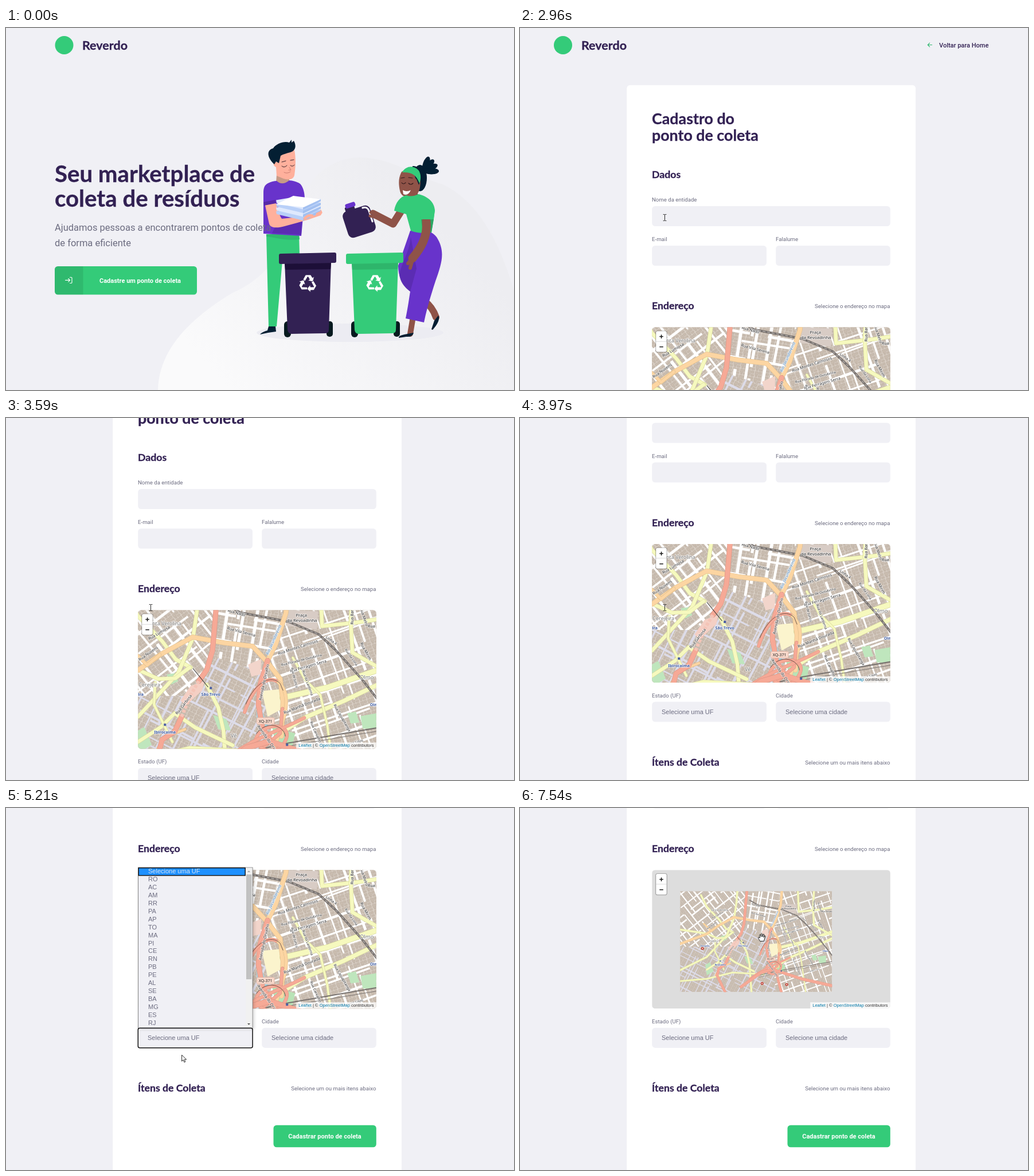
Animation, 886 px wide and 632 px high, one loop 8 s. Source, as an HTML page:

```html
<!DOCTYPE html>
<html lang="pt-BR">
<head>
<meta charset="utf-8">
<title>Pontos de coleta</title>
<style>
html, body { margin: 0; width: 100%; height: 100%; overflow: hidden; background: #f0f0f5; }
svg { display: block; width: 100vw; height: 100vh; }
text { white-space: pre; }
.head { font-family: Lato, sans-serif; font-weight: 700; fill: #322153; stroke: #322153; stroke-width: .3; }
.body { font-family: Roboto, sans-serif; fill: #6c6c80; }
.bold { font-family: Roboto, sans-serif; font-weight: 700; fill: #fff; }
.nav { font-family: Roboto, sans-serif; font-weight: 500; fill: #322153; }
.ui { font-family: "Liberation Sans", Arial, sans-serif; fill: #6c6c80; }
.map { font-family: "Noto Sans", sans-serif; text-anchor: middle; paint-order: stroke; stroke: #fff; stroke-width: 1.6; stroke-opacity: .8; }
.street { fill: #222; }
.area { fill: #777; }
.metro { fill: #3b5ba5; font-weight: 700; }
.river { fill: #4a86c0; font-style: italic; }
</style>
</head>
<body>
<svg id="stage" viewBox="0 0 886 632" preserveAspectRatio="none"></svg>
<script>
const LOOP = 8000;
const GREEN = '#34cb79', DARK_GREEN = '#2fb86e', PLUM = '#322153', VIOLET = '#6833cb';
const NAVY = '#041f33', PEACH = '#ffb09c', BROWN = '#8f5348';

let seed = 11;
const rnd = () => (seed = seed * 16807 % 2147483647) / 2147483647;

const text = (cls, size, x, y, str, extra = '') =>
  `<text class="${cls}" font-size="${size}" x="${x}" y="${y}" ${extra}>${str}</text>`;
const rect = (x, y, w, h, fill, r = 0, extra = '') =>
  `<rect x="${x}" y="${y}" width="${w}" height="${h}" rx="${r}" fill="${fill}" ${extra}/>`;
const shape = (d, fill) => `<path d="${d}" fill="${fill}"/>`;
const line = (d, color, w, extra = '') =>
  `<path d="${d}" fill="none" stroke="${color}" stroke-width="${w}" stroke-linecap="round" stroke-linejoin="round" ${extra}/>`;
const END = 'text-anchor="end"';

// ---------- home ----------
function recycle(x, y, back) {
  const d = 'M-9 -6L-4 -15H5L8 -10L11 -12L9 -3L0 -5L3 -7L0 -12L-5 -4Z';
  return [0, 120, 240].map(a =>
    `<path d="${d}" transform="translate(${x} ${y}) rotate(${a})" fill="#fff" stroke="${back}" stroke-width=".8"/>`).join('');
}

function bin(x, color, band) {
  return rect(x + 9, 512, 12, 28, '#061a1f', 6) + rect(x + 83, 512, 11, 27, '#061a1f', 5) +
    shape(`M${x + 10} 408H${x + 91}L${x + 87} 527Q${x + 87} 533 ${x + 80} 533L${x + 22} 534Q${x + 16} 534 ${x + 15} 527Z`, color) +
    shape(`M${x + 10} 410H${x + 91}L${x + 90} 421L${x + 11} 422Z`, band) +
    shape(`M${x + 3} 394L${x + 97} 392Q${x + 100} 392 ${x + 100} 395V407Q${x + 100} 410 ${x + 97} 410L${x + 3} 412Q${x} 412 ${x} 409V397Q${x} 394 ${x + 3} 394Z`, color) +
    recycle(x + 50.5, 446, color);
}

function man() {
  const sheets = [0, 1, 2, 3].map(i => {
    const y = 333 - i * 6.5;
    return shape(`M472 ${y - 8}L518 ${y + 3}L549 ${y - 11}V${y - 15}L500 ${y - 18}L471 ${y - 13}Z`, i % 2 ? '#dfe9fd' : '#b9d0f8') +
      shape(`M518 ${y - 1}L549 ${y - 15}V${y - 11}L518 ${y + 4}Z`, '#a3c0f0');
  }).join('');
  return shape('M454 360H511L512 395H483L472 521H458Z', GREEN) +
    shape('M454 360H511L512 369C490 372 470 366 454 364Z', DARK_GREEN) +
    shape('M458 521H470L471 530L457 532L443 535Q446 531 456 528Z', NAVY) +
    shape('M472 256H494V271Q482 280 471 271Z', '#c79a86') +
    shape('M474 218L503 213C506 228 505 244 503 257C501 266 491 265 484 263L472 258L471 243C464 240 466 231 473 234Z', PEACH) +
    shape('M468 238C455 226 454 213 466 210C471 202 485 197 494 200L498 195V200L502 197C507 206 505 214 496 217C489 219 484 220 479 223L476 236L471 233Z', NAVY) +
    line('M481 241Q485 245 490 240M496 240Q500 243 503 239M481 234L488 232M496 231L502 230', '#37232b', 1) +
    line('M485 252Q490 255 496 251M494 243L497 248H493', '#c4766b', .9) +
    shape('M457 271Q465 267 472 267Q482 276 494 266Q506 267 513 272C519 278 521 290 521 298L515 363L449 359V288C449 279 451 274 457 271Z', VIOLET) +
    shape('M472 342L516 336L515 361L464 358Z', '#5b2bb2') +
    shape('M451 305L469 302C474 314 476 326 481 333L519 329L549 317Q553 321 549 327L526 335L486 346C472 350 461 349 459 342Z', PEACH) +
    shape('M449 304L470 300L471 306L450 310Z', '#5729a8') + sheets +
    shape('M471 308L501 293L549 299L519 313Z', '#fff') +
    line('M521 333Q526 326 534 328M543 325L549 322', PEACH, 5);
}

function woman() {
  return line('M729 476Q744 487 750 505', BROWN, 12) + line('M709 510L705 534', BROWN, 10) +
    shape('M754 502C758 510 750 520 744 527L742 526L747 511Z', NAVY) +
    shape('M711 532Q709 540 698 539L685 541Q684 537 695 535Z', NAVY) +
    shape('M705 354C722 348 742 353 751 365C767 390 760 411 749 442C740 470 734 490 729 514L697 507C701 488 703 472 705 460C690 448 684 432 684 415Z', VIOLET) +
    shape('M706 365C704 390 690 410 686 430Q688 448 705 460L716 420Z', '#5b2cb3') +
    `<g fill="${NAVY}"><ellipse cx="722" cy="262" rx="12" ry="23"/>` +
    [-70, -48, -25, 0].map(a => `<ellipse cx="14" rx="13" ry="5.5" transform="translate(728 250) rotate(${a})"/>`).join('') + '</g>' +
    shape('M702 280H718V298H702Z', '#71413a') +
    shape('M690 251Q710 239 722 258C724 275 722 289 712 294Q690 299 687 284C684 270 685 260 690 251Z', BROWN) +
    shape('M709 241C722 240 727 255 720 274L716 264C712 262 714 253 709 253Z', NAVY) +
    shape('M691 252C697 240 712 239 720 249C725 257 723 267 721 271C716 258 709 251 691 252Z', GREEN) +
    line('M690 270Q693 274 697 270M702 271Q706 275 710 271M689 262L695 261M702 261L709 262', '#32191b', 1.1) +
    shape('M692 283Q699 287 706 283Q701 294 693 290Z', '#fff') +
    line('M690 318L675 342L640 324', BROWN, 13) +
    shape('M698 292Q708 296 719 290C736 294 747 304 748 318L742 357Q722 360 706 354L698 325L677 319C679 305 688 294 698 292Z', GREEN) +
    shape('M724 334H746L742 357L727 358Z', '#2aa865') +
    line('M733 337C736 365 723 385 709 402', BROWN, 15) + line('M711 398L705 419M707 403L701 411', BROWN, 6) +
    shape('M722 322L748 318L746 334H723Z', GREEN) +
    '<g transform="translate(616 338) rotate(-18)">' +
    rect(-25, -24, 50, 48, PLUM, 9) + rect(-17, -31, 17, 10, PLUM, 2) + rect(-15, -36, 18, 8, VIOLET, 3) +
    line('M13 -21Q22 -21 22 -12V7', '#fff', 3) + '</g>' + line('M636 322L645 326M635 328L643 330', BROWN, 5);
}

function home() {
  return shape('M265 632C267 560 322 507 394 463C450 438 480 400 500 335C516 270 562 226 617 226C680 228 713 260 762 273C820 301 858 365 886 458V632Z', 'url(#blob)') +
    '<circle cx="101.5" cy="30" r="16" fill="#34cb79"/>' + text('head', 21.5, 133, 38, 'Reverdo') +
    '<ellipse cx="600" cy="532" rx="163" ry="16" fill="#ececf2"/>' +
    man() + woman() + bin(476, PLUM, '#1d0f38') + bin(593, GREEN, '#2eb56b') +
    text('head', 40.2, 85, 269, 'Seu marketplace de') + text('head', 40.2, 85, 312, 'coleta de resíduos') +
    text('body', 16.5, 85, 354, 'Ajudamos pessoas a encontrarem pontos de coleta') +
    text('body', 16.5, 85, 381, 'de forma eficiente') +
    rect(85, 416, 248, 49.5, GREEN, 5.5, 'id="enter"') +
    shape('M134.500 416H90.500Q85 416 85 421.500V460Q85 465.500 90.500 465.500H134.500Z', 'rgba(0,0,0,.09)') +
    `<g transform="translate(103 433.500) scale(.57)">${line('M15 3H19A2 2 0 0 1 21 5V19A2 2 0 0 1 19 21H15M10 17L15 12L10 7M15 12H1', '#fff', 2)}</g>` +
    text('bold', 11, 163, 444.5, 'Cadastre um ponto de coleta');
}

// ---------- map ----------
const TILES = { x: -93, y: -44, w: 530, h: 352 };

// A district: houses crossed by two families of slightly uneven streets.
function zone(id, points, angle, gapX, gapY, color, width) {
  const street = d => line(d, color, (width * (.7 + rnd() * .6)).toFixed(1),
    `stroke-dasharray="${90 + rnd() * 150 | 0} ${10 + rnd() * 30 | 0}" style="stroke-linecap:butt"`);
  const family = (gap, path) => {
    let out = '';
    for (let p = -480; p < 480; p += gap * (.7 + rnd() * .6)) out += street(path(p | 0, (p + rnd() * 40 - 20) | 0));
    return out;
  };
  return `<clipPath id="${id}"><polygon points="${points}"/></clipPath><g clip-path="url(#${id})"><g transform="translate(170 130) rotate(${angle})">` +
    rect(-500, -500, 1000, 1000, 'url(#houses)') +
    family(gapX, (a, b) => `M${a} -500L${b} 500`) + family(gapY, (a, b) => `M-500 ${a}L500 ${b}`) + '</g></g>';
}

const road = (d, w, color, edge) => line(d, edge, w + 1.2) + line(d, color, w);
const pink = (d, w = 8) => road(d, w, '#f6a996', '#dc9484');
const orange = (d, w = 7.5) => road(d, w, '#fcd5a2', '#dfbd8b');
const yellow = (d, w = 6) => road(d, w, '#f6f9be', '#d5d69a');

function labels() {
  const streets = [
    ['Rua Vila Serena', 180, 38, 15], ['Rua Montes Calmosos', 279, 65, -18],
    ['Rua Florada de Outubrina', 285, 87, -14, 6], ['Rua Ferragem Serra', 297, 98, -16],
    ['Rua Manhã Dourada', 286, 167, -22], ['Avenida do Orvalho', 220, 126, -78],
    ['Avenida do Orvalho', 228, 228, 55], ['Rua Nuvens', 18, 76, -35], ['Rua Lumiosa', 37, 40, -30],
    ['Rua Garbosa', 80, 165, -52], ['Rua Nadir', 172, 5, 16], ['Rua Bambu', 374, 6, -90],
    ['Rua Melro', 394, 12, 72], ['Linha 4', 337, 53, 35, 6.5], ['Rua da Lona', 372, 82, 55, 6],
    ['Rua Mirim', 397, 72, 62], ['Rua de Junco', 273, 118, 76, 6], ['Rua da Lanterna', 296, 127, 70, 6],
    ['Rua Cajuapitanga', 356, 188, 60, 6.5], ['Rua Carvalho Leve', 313, 220, 66, 6.5],
    ['Campos Lisos', 374, 232, -15, 6], ['Rua Tessala', 420, 28, 0]];
  const areas = [['Praça', 285, 9, 0, 7.5], ['da Revoadinha', 286, 18, 0, 7.5]];
  const put = (cls, [s, x, y, a = 0, size = 7]) =>
    text(`map ${cls}`, size, 0, 2, s, `transform="translate(${x} ${y}) rotate(${a})"`);
  return streets.map(s => put('street', s)).join('') + areas.map(s => put('street', s)).join('') +
    [['Santa Verolina', 45, 24, 0, 9], ['Cerejeira', 20, 131, 0, 9], ['Olmo', 399, 118, 0, 9.5], ['Vê', 167, 220, 0, 9]]
      .map(s => put('area', s)).join('') +
    [['São Trevo', 127, 147], ['Ibirocaima', 47, 213], ['Olmo', 414, 165], ['Cerejeira', -6, 147]]
      .map(s => put('metro', s)).join('') +
    put('river', ['Rio Jacundarema', 237, 52, -66, 7.5]) +
    rect(207, 187.5, 31, 11.5, '#f8d7c9', 2, 'stroke="#dba999" stroke-width=".6"') +
    text('map street', 7, 222.5, 196, 'XQ-371', 'style="stroke:none"');
}

function tiles() {
  const rail = 'M150 -12L178 4L262 20L315 42L345 70L390 120L437 180';
  return rect(TILES.x, TILES.y, TILES.w, TILES.h, '#d3c7bb') +
    zone('za', '-93,-44 138,-44 128,80 95,150 -93,150', -38, 19, 25, '#fff', 4.6) +
    zone('zb', '138,-44 262,-44 245,60 225,110 220,140 125,100', 10, 20, 30, '#fff', 4.4) +
    zone('zc', '260,-44 437,-44 437,308 240,308 222,110', -19, 24, 25, '#fff', 3.6) +
    zone('zd', '-93,150 95,150 128,80 224,110 240,308 -93,308', 27, 18, 21, '#dddce9', 3.4) +
    shape('M258 0L314 2L312 34L258 27Z', '#d8ccc5') +
    shape('M216 141L248 138L252 172L226 186Z', '#fbf4cd') +
    shape('M207 150L214 170L228 205L220 216L207 190Z', '#abd3df') +
    shape('M234 204L274 215L268 242L240 236Z', '#b9e3b7') + shape('M365 180L380 177L386 196L371 198Z', '#bfe6bd') +
    shape('M388 185L416 180V207L392 207Z', '#bfe6bd') + shape('M131 183L154 190L162 210L140 208Z', '#bfe6bd') +
    shape('M-5 213L11 204L24 235L0 250Z', '#bfe6bd') + shape('M192 95L215 85L214 112L198 116Z', '#f2d5cb') +
    shape('M50 112L66 110L70 124L58 130Z', '#bfe6bd') + shape('M92 132L116 124L112 140L84 166L74 158Z', '#f4cfc4') +
    yellow('M-20 -30L0 10L42 54L66 86L92 100') + yellow('M107 -44L103 0L96 48L70 110L0 186L-93 232') +
    yellow('M-93 90L0 104L35 120L65 119L90 100') + yellow('M120 130L140 170L149 210L156 308') +
    yellow('M0 230L40 204L64 180L100 205L165 236') + yellow('M30 126L28 165L60 230', 4) +
    yellow('M252 153L330 135L437 98', 9) + yellow('M254 211L290 188L360 158L437 121', 7) +
    yellow('M318 -44L321 28L385 21L437 13') + yellow('M374 -44L371 20L374 74L437 110') +
    yellow('M270 83L292 122L318 148L330 200L345 308', 3.5) + yellow('M-93 270L0 262L90 240L200 246', 5) +
    line(rail, '#77716e', 4) + line(rail, '#b9b4b0', 1.2, 'stroke-dasharray="4 4"') +
    line('M170 252L262 232L437 202', '#77716e', 2) + line('M182 257L270 236L437 208', '#77716e', 1) +
    orange('M-93 140L0 105L40 77L95 47L150 57L200 63L225 90L248 120L253 160L250 220') +
    orange('M262 -44L258 5L240 60L226 88') + orange('M-10 70L16 96L38 78', 5) + orange('M30 250L46 222L82 208', 4) +
    pink('M140 -44L136 0L130 70L120 104L106 124') + pink('M76 186L64 212L42 226L36 250L64 308') +
    line('M106 124L92 148L76 186', '#f4c4b7', 6, 'stroke-dasharray="5 3" style="stroke-linecap:butt"') +
    pink('M226 88L213 130L210 165L217 205L245 250L260 308') +
    pink('M186 178C200 135 225 111 245 126', 5) + orange('M245 126C262 140 262 170 250 200L240 236', 5) +
    pink('M252 172L248 215L215 242', 5) +
    pink('M205 226C215 195 270 195 258 226C245 255 215 250 205 226Z', 5) +
    pink('M150 262C205 220 245 212 290 188', 5) + pink('M120 290L190 240L229 229L330 262L437 286', 9) +
    line('M188 164C205 125 232 112 248 128L253 140M206 216C225 190 255 202 257 220', '#4f3b36', .8) +
    line('M96 102L122 134', '#333', 1.1) +
    [[47, 200], [127, 136], [260, 235]].map(([x, y]) => rect(x - 2, y - 2, 4, 4, '#4b5fa3')).join('') +
    [[-15, 156], [193, 278], [279, 282]].map(([x, y]) => `<circle cx="${x}" cy="${y}" r="5" fill="#c0392b"/><circle cx="${x}" cy="${y}" r="2" fill="#fff"/>`).join('') +
    labels();
}

function map() {
  const key = (y, s) => text('ui', 13, 16.3, y, s, 'text-anchor="middle" style="fill:#111;font-weight:700"');
  return `<g transform="translate(230.200 522.500)"><g clip-path="url(#frame)">` + rect(0, 0, 416, 242, '#ddd') +
    `<g id="tiles"><g clip-path="url(#tileBox)">${tiles()}</g></g>` +
    rect(276, 231, 140, 11, '#fff', 0, 'opacity=".75"') +
    `<text class="ui" font-size="7.56" x="280" y="238.800" style="fill:#333"><tspan fill="#0078a8">Leaflet</tspan> | © <tspan fill="#0078a8">OpenStreetMap</tspan> contributors</text>` +
    rect(6, 6, 20.5, 38, 'rgba(0,0,0,.32)', 3.5) + rect(7, 6.8, 18.5, 36.2, '#fff', 2.5) +
    line('M7 24.800H25.500', '#ccc', .7) + key(20.5, '+') + key(38.5, '−') + '</g></g>';
}

// ---------- form ----------
const STATES = 'RO AC AM RR PA AP TO MA PI CE RN PB PE AL SE BA MG ES RJ'.split(' ');

function form() {
  const field = (x, y, w) => rect(x, y, w, 35, '#f0f0f5', 5.5);
  const label = (x, y, s, extra) => text('body', 9.65, x, y, s, extra);
  return '<circle cx="75" cy="30" r="16" fill="#34cb79"/>' + text('head', 21.5, 107, 38, 'Reverdo') +
    line('M718.500 29.500H711.500M714.500 26.200L711.200 29.500L714.500 32.800', '#2fb86e', 1.1) +
    text('nav', 11, 731, 34, 'Voltar para Home') +
    rect(186.3, 99.8, 503.7, 1100, '#fff', 5.5) +
    text('head', 26.8, 230, 168, 'Cadastro do') + text('head', 26.8, 230, 197, 'ponto de coleta') +
    text('head', 17.7, 230, 262, 'Dados') +
    label(230, 302.5, 'Nome da entidade') + field(230.2, 311, 415.6) +
    label(230, 372, 'E-mail') + field(230.2, 380, 199.8) +
    label(446, 372, 'Falalume') + field(446.2, 380, 199.6) +
    text('head', 17.7, 230, 491, 'Endereço') + label(645.5, 489, 'Selecione o endereço no mapa', END) +
    map() +
    label(230, 790, 'Estado (UF)') + field(230.2, 798, 199.8) + text('ui', 11, 247, 819, 'Selecione uma UF') +
    label(446, 790, 'Cidade') + field(446.2, 798, 199.6) + text('ui', 11, 463, 819, 'Selecione uma cidade') +
    text('head', 17.7, 230, 909, 'Ítens de Coleta') + label(645.5, 907, 'Selecione um ou mais itens abaixo', END) +
    rect(466.5, 968, 179.3, 38.6, GREEN, 5.5) +
    text('bold', 11, 556, 991.5, 'Cadastrar ponto de coleta', 'text-anchor="middle"');
}

function dropdown() {
  return rect(233, 107, 200, 279, 'rgba(0,0,0,.16)', 2, 'filter="url(#soft)"') +
    rect(230.5, 104, 199.5, 280.5, '#f0f0f5', 0, 'stroke="#777" stroke-width=".9"') +
    rect(231.2, 104.6, 186, 13.2, '#1e90ff', 0, 'stroke="#111" stroke-width="1.4"') +
    text('ui', 11, 248, 114, 'Selecione uma UF', 'style="fill:#dce6f2"') +
    STATES.map((s, i) => text('ui', 11, 248, 128 + i * 13.94, s)).join('') +
    rect(418, 104.5, 11.3, 279.5, '#f1f1f1') + rect(419, 116, 9.3, 183, '#c1c1c1') +
    shape('M421 112H426L423.500 109.200Z', '#a3a3a3') + shape('M421 376H426L423.500 378.800Z', '#505050') +
    rect(230.3, 384.3, 199.8, 34.5, 'none', 3, 'stroke="#101010" stroke-width="1.5"');
}

// ---------- stage ----------
document.getElementById('stage').innerHTML = `<defs>
  <linearGradient id="blob" gradientUnits="userSpaceOnUse" x1="380" y1="620" x2="720" y2="300">
    <stop offset="0" stop-color="#fafafb"/><stop offset="1" stop-color="#ededf1"/></linearGradient>
  <pattern id="houses" width="13" height="11" patternUnits="userSpaceOnUse">${rect(0, 0, 13, 11, '#d9cfc5')}
    <path d="M1 1h5v6h-5zM7.500 1h4v4h-4zM7 7h5v3h-5zM2 8h3v2h-3z" fill="#cabdb0" stroke="#b5a79a" stroke-width=".6"/></pattern>
  <clipPath id="frame">${rect(0, 0, 415.6, 242, '#000', 5.5)}</clipPath>
  <clipPath id="tileBox">${rect(TILES.x, TILES.y, TILES.w, TILES.h, '#000')}</clipPath>
  <filter id="soft"><feGaussianBlur stdDeviation="2.500"/></filter></defs>
  ${rect(0, 0, 886, 632, '#f0f0f5')}
  <g id="home">${home()}</g><g id="form">${form()}</g><g id="menu">${dropdown()}</g>
  <g id="cursor" stroke="#111" stroke-width=".9" stroke-linejoin="round" fill="#fff">
    <path id="arrow" d="M0 0V11L2.600 8.700L4.300 12.800L6.200 12L4.500 8H8Z"/>
    <path id="beam" fill="none" d="M-2.800 -5.500H-1Q0 -5.500 0 -4.500Q0 -5.500 1 -5.500H2.800M0 -4.500V4.500M-2.800 5.500H-1Q0 5.500 0 4.500Q0 5.500 1 5.500H2.800"/>
    <path id="hand" d="M-3 6.500L-6 1Q-6 -1 -4 0L-3 1L-4 -4Q-3.500 -6 -2 -4.500L-1 -1V-6Q0 -7.500 1 -6L1.300 -1L2.500 -5.500Q4 -6.500 4.200 -5L3.600 0L5 -3Q6.500 -3.600 6.300 -2L4.500 4L4 6.500Z"/></g>`;

const el = Object.fromEntries(['home', 'form', 'menu', 'enter', 'tiles', 'cursor', 'arrow', 'beam', 'hand']
  .map(id => [id, document.getElementById(id)]));
const show = (node, on) => node.setAttribute('display', on ? 'inline' : 'none');
const clamp = v => Math.min(1, Math.max(0, v));

// Linear track through [time, ...values].
function track(keys, t) {
  const i = keys.findIndex(k => k[0] > t);
  if (i === 0) return keys[0].slice(1);
  if (i < 0) return keys[keys.length - 1].slice(1);
  const a = keys[i - 1], b = keys[i], p = (t - a[0]) / (b[0] - a[0]);
  return a.slice(1).map((v, n) => v + (b[n + 1] - v) * p);
}

const POINTER = [[240, 822, 632], [1030, 216, 441], [1110, 212, 440], [1400, 128, 418], [1720, 160.5, 433],
  [2250, 160.5, 433], [2900, 252.5, 331], [4330, 252.5, 331], [4650, 281, 396], [4910, 280, 407],
  [5170, 280, 407], [5210, 306.5, 431], [5370, 319, 441], [5480, 320, 441], [5900, 388, 437],
  [6070, 388, 435], [6850, 416, 389], [7080, 421.5, 226]];
const SCROLL = [[3020, 0], [3590, 187], [3970, 302.5], [4210, 414.3]];
const PAGE_AT = 1960, OPEN_AT = 4680, CLOSE_AT = 6100;

function render(t) {
  const [x, y] = track(POINTER, t);
  const onForm = t >= PAGE_AT;
  show(el.home, !onForm);
  show(el.form, onForm);
  show(el.menu, t >= OPEN_AT && t < CLOSE_AT);
  el.enter.setAttribute('fill', t > 260 && x < 333 && y < 465 ? DARK_GREEN : GREEN);

  const step = 3590 + Math.floor((t - 3590) / 76) * 76;
  el.form.setAttribute('transform', `translate(0 ${-track(SCROLL, step)[0].toFixed(1)})`);

  const zoom = 1 - .5 * (1 - (1 - clamp((t - 7270) / 270)) ** 3);
  el.tiles.setAttribute('transform', `translate(191 118) scale(${zoom}) translate(-191 -118)`);
  el.tiles.setAttribute('opacity', clamp((t - 2200) / 200));

  const beam = onForm && t < 4340 && x > 230 && y < 346;
  const hand = t >= 4340 && y < 350 && (t < OPEN_AT || t > CLOSE_AT);
  show(el.cursor, t >= 260);
  show(el.beam, beam);
  show(el.hand, hand);
  show(el.arrow, !beam && !hand);
  el.cursor.setAttribute('transform', `translate(${x.toFixed(1)} ${y.toFixed(1)})`);
}

const start = performance.now();
function tick() {
  render((performance.now() - start) % LOOP);
  requestAnimationFrame(tick);
}
render(0);
requestAnimationFrame(tick);
</script>
</body>
</html>
```
